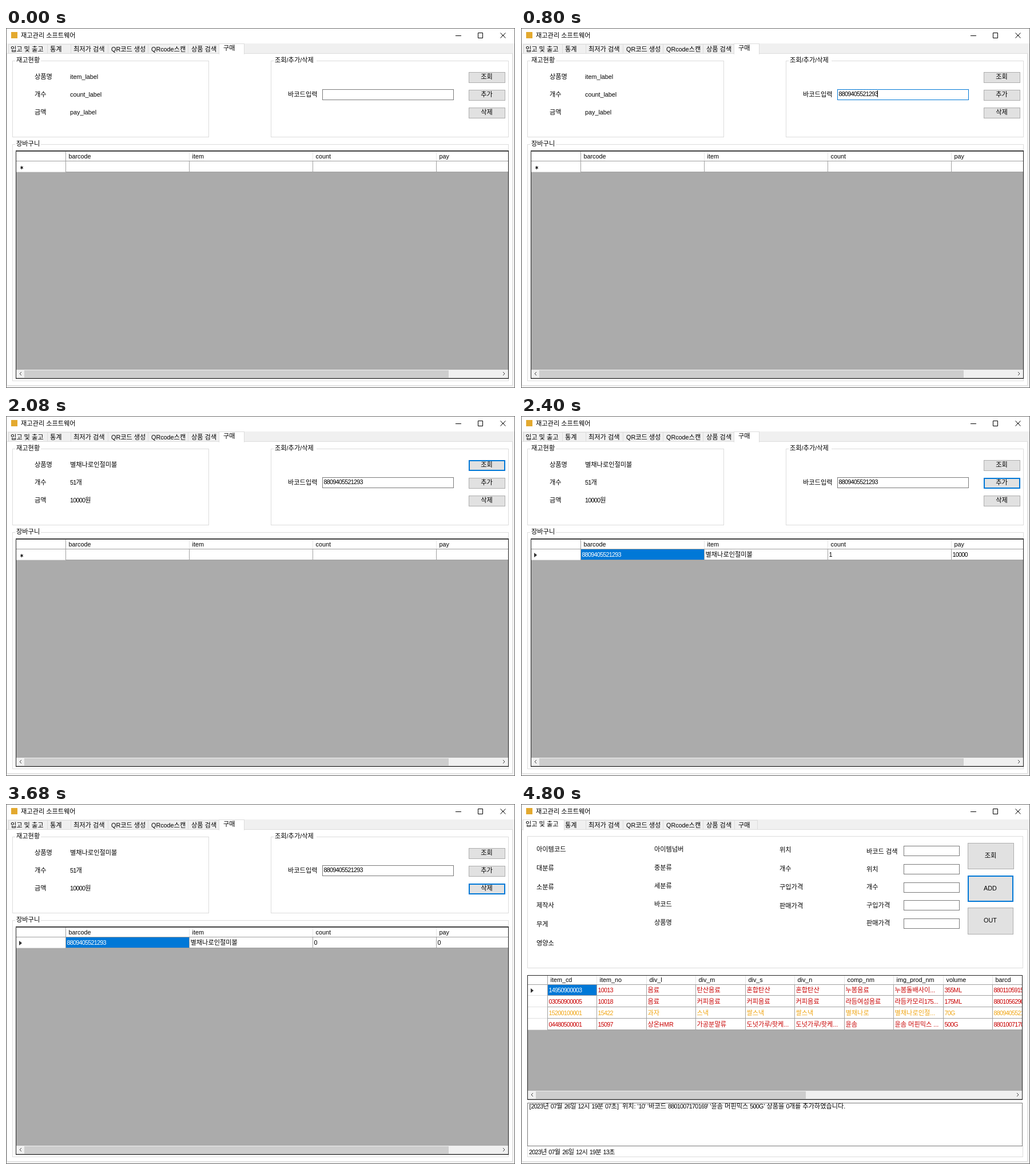
Recreate the animation shown at these times as an HTML page. Size 890 by 629 pixels, loop 5600 ms.

```html
<!DOCTYPE html>
<html lang="ko">
<head>
<meta charset="utf-8">
<style>
  html, body { margin: 0; height: 100%; overflow: hidden; }
  svg { display: block; }
  text { font: 10.8px "Liberation Sans", "Noto Sans CJK KR", sans-serif; white-space: pre; }
  .ko { font-size: 11.2px; }
  .num { letter-spacing: -.75px; }
  rect { shape-rendering: crispEdges; }
</style>
</head>
<body>
<svg id="stage" width="890" height="629" viewBox="0 0 890 629"></svg>
<script>
const STEP = 800;
const BLUE = '#0078d7', LIGHT = '#dcdcdc', LINE = '#a0a0a0', FACE = '#f0f0f0', RED = '#c80000', ORANGE = '#f0a514';
const BALL = '별채나로인절미볼', CIDER = '누봄돌배사이다355ML', COFFEE = '라듬카모리175ML';
const BALL_CODE = '8809405521293', COFFEE_CODE = '8801056290016', CIDER_CODE = '8801105915419';

const fill = (x, y, w, h, color) => `<rect x="${x}" y="${y}" width="${w}" height="${h}" fill="${color}"/>`;
const hline = (x1, x2, y, color) => fill(x1, y, x2 - x1, 1, color);
const vline = (x, y1, y2, color) => fill(x, y1, 1, y2 - y1, color);
const box = (x1, y1, x2, y2, stroke, inside = '#fff', weight = 1) =>
  `<rect x="${x1 + weight / 2}" y="${y1 + weight / 2}" width="${x2 - x1 + 1 - weight}" height="${y2 - y1 + 1 - weight}"
    fill="${inside}" stroke="${stroke}" stroke-width="${weight}"/>`;
const path = (d, color = '#000') => `<path d="${d}" fill="none" stroke="${color}"/>`;

// y is the middle of the line; Hangul and digits get their own metrics
function text(x, y, str, color = '#000', anchor = 'start') {
  const runs = str.replace(/[가-힣]+|\d+/g, run =>
    `<tspan class="${/\d/.test(run) ? 'num' : 'ko'}">${run}</tspan>`);
  return `<text x="${x}" y="${y + 4}" fill="${color}" text-anchor="${anchor}">${runs}</text>`;
}
const labels = (x, list) => list.map(([str, y]) => text(x, y, str)).join('');

function button(x1, y1, x2, y2, caption, focused) {
  return box(x1, y1, x2, y2, focused ? BLUE : '#adadad', '#e1e1e1', focused ? 2 : 1)
    + text((x1 + x2) / 2, (y1 + y2) / 2 - 1, caption, '#000', 'middle');
}

function group(x1, y1, x2, y2, title, gap) {
  return box(x1, y1, x2, y2, LIGHT) + fill(x1 + 5, y1, gap, 1, '#fff') + text(x1 + 7, y1 - 1, title);
}

function scrollbar(x1, x2, y, thumbEnd) {
  return fill(x1, y, x2 - x1, 14, FACE) + fill(x1 + 14, y + 1, thumbEnd - x1 - 14, 13, '#cdcdcd')
    + path(`M${x1 + 9} ${y + 4}l-3 3l3 3M${x2 - 9} ${y + 4}l3 3l-3 3`, '#404040');
}

// Data grid whose first cell is selected unless it holds only the blank new row
function grid(g) {
  const { x1, y1, x2, y2, cols, heads, rows, top, colors = [] } = g;
  const blank = !rows.length;
  const count = Math.max(rows.length, 1);
  const bottom = top + count * 20;
  let out = box(x1, y1, x2, y2, '#202020', '#ababab')
    + fill(x1 + 1, y1 + 1, x2 - x1 - 1, bottom - y1 - 1, '#fff')
    + hline(x1 + 1, x2, top, LINE);
  for (let r = 1; r <= count; r++)
    out += hline(x1 + 1, cols[0], top + r * 20 - 1, '#e0e0e0') + hline(cols[0], x2, top + r * 20 - 1, LINE);
  cols.forEach((x, c) => {
    out += vline(x, y1 + 1, top, c ? '#e5e5e5' : LINE) + vline(x, top, bottom, LINE) + text(x + 5.5, top - 8, heads[c]);
  });
  if (!blank) out += fill(cols[0] + 1, top + 1, cols[1] - cols[0] - 1, 18, BLUE);
  rows.forEach((row, r) => row.forEach((str, c) => {
    out += text(cols[c] + 2.5, top + 9.5 + r * 20, str, r + c ? colors[r] : '#fff');
  }));
  const my = top + 11;
  out += blank
    ? path(`M${x1 + 10.5} ${my - 2}v6M${x1 + 8} ${my - .5}l5 3m0-3l-5 3`)
    : `<path d="M${x1 + 6} ${my - 4}l5 4l-5 4z" fill="#303030"/>`;
  return `<svg width="${x2}" height="629">${out}</svg>` + vline(x2, y1, y2 + 1, '#202020')
    + scrollbar(x1 + 1, x2, y2 - 15, g.thumbEnd);
}

const TABS = ['입고 및 출고', '통계', '최저가 검색', 'QR코드 생성', 'QRcode스캔', '상품 검색', '구매'];
const TAB_EDGES = [4, 72, 113, 178, 248, 318, 373, 413];
const TAB_TEXT = [8, 77, 118, 184, 254, 324, 380];

function chrome(active) {
  const tab = i => {
    const on = i === active ? 2 : 0;
    return box(TAB_EDGES[i] - on / 2, 28 - on / 2, TAB_EDGES[i + 1] + on * 1.5, 45, LIGHT, on ? '#fff' : FACE)
      + (on && fill(TAB_EDGES[i], 44, TAB_EDGES[i + 1] - TAB_EDGES[i] + 3, 2, '#fff') || '')
      + text(TAB_TEXT[i], on ? 35 : 36.5, TABS[i]);
  };
  const rest = TABS.map((_, i) => i).filter(i => i !== active);
  return box(0, 0, 889, 628, '#6e6e6e', FACE) + fill(1, 1, 888, 26, '#fff')
    + fill(9, 7, 11, 11, '#e3a92f') + text(26, 13, '재고관리 소프트웨어')
    + path('M786 13.5h10M825.5 8.5h8v9h-8zM864.5 8.5l9 9m0-9l-9 9')
    + rest.map(tab).join('') + box(1, 44, 885, 624, LIGHT) + tab(active);
}

function cartPage({ name = 'item_label', count = 'count_label', pay = 'pay_label', code = '', focus, rows = [] }) {
  return chrome(6)
    + group(11, 57, 354, 190, '재고현황', 45)
    + labels(50, [['상품명', 85], ['개수', 116], ['금액', 147]])
    + labels(112, [[name, 85], [count, 116], [pay, 147]])
    + group(463, 57, 878, 190, '조회/추가/삭제', 75)
    + text(493, 116, '바코드입력')
    + box(553, 107, 782, 125, focus === 'input' ? BLUE : '#7a7a7a') + text(555.5, 114.5, code)
    + (focus === 'input' ? vline(623, 109, 121, '#000') : '')
    + ['조회', '추가', '삭제'].map((s, i) => button(809, 77 + i * 31, 872, 95 + i * 31, s, focus === s)).join('')
    + group(11, 203, 878, 616, '장바구니', 45)
    + grid({ x1: 17, y1: 214, x2: 878, y2: 612, cols: [104, 320, 536, 752], top: 232,
        heads: ['barcode', 'item', 'count', 'pay'], rows, thumbEnd: 774 })
    + hline(17, 878, 215, '#606060');
}

function stockPage() {
  const cols = Array.from({ length: 10 }, (_, i) => Math.floor(46.5 + i * 86.45));
  const fields = ['바코드 검색', '위치', '개수', '구입가격', '판매가격'];
  return chrome(0) + box(11, 56, 877, 286, LIGHT)
    + labels(27, ['아이템코드', '대분류', '소분류', '제작사', '무게', '영양소'].map((s, i) => [s, 79 + i * 32.8]))
    + labels(233, ['아이템넘버', '중분류', '세분류', '바코드', '상품명'].map((s, i) => [s, 79 + i * 32]))
    + labels(452, ['위치', '개수', '구입가격', '판매가격'].map((s, i) => [s, 80 + i * 32.7]))
    + fields.map((s, i) => text(604, 83 + i * 31.2, s)
        + box(669, Math.round(73 + i * 31.8), 766, Math.round(90 + i * 31.8), '#7a7a7a')).join('')
    + button(781, 68, 861, 113, '조회') + button(781, 125, 860, 170, 'ADD', true) + button(781, 181, 860, 227, 'OUT')
    + grid({ x1: 11, y1: 299, x2: 876, y2: 516, cols, top: 315, thumbEnd: 498,
        colors: [RED, RED, ORANGE, RED],
        heads: ['item_cd', 'item_no', 'div_l', 'div_m', 'div_s', 'div_n', 'comp_nm', 'img_prod_nm', 'volume', 'barcd'],
        rows: [
          ['14950900003', '10013', '음료', '탄산음료', '혼합탄산', '혼합탄산', '누봄음료', '누봄돌배사이...', '355ML', CIDER_CODE],
          ['03050900005', '10018', '음료', '커피음료', '커피음료', '커피음료', '라듬여섬음료', '라듬카모리175...', '175ML', COFFEE_CODE],
          ['15200100001', '15422', '과자', '스낵', '쌀스낵', '쌀스낵', '별채나로', '별채나로인절...', '70G', BALL_CODE],
          ['04480500001', '15097', '상온HMR', '가공분말류', '도넛가루/핫케...', '도넛가루/핫케...', '윤솜', '윤솜 머핀믹스 ...', '500G', '8801007170169']
        ] })
    + box(11, 597, 877, 616, LIGHT) + box(11, 522, 876, 597, '#7a7a7a')
    + text(14.5, 528, "[2023년 07월 26일 12시 19분 07초]  위치: '10' '바코드 8801007170169' '윤솜 머핀믹스 500G' 상품을 0개를 추가하였습니다.")
    + text(14, 608, '2023년 07월 26일 12시 19분 13초');
}

const ball = { name: BALL, count: '51개', pay: '10000원', code: BALL_CODE };
const scenes = [
  cartPage({}),
  cartPage({ code: BALL_CODE, focus: 'input' }),
  cartPage({ ...ball, focus: '조회' }),
  cartPage({ ...ball, focus: '추가', rows: [[BALL_CODE, BALL, '1', '10000']] }),
  cartPage({ ...ball, focus: '삭제', rows: [[BALL_CODE, BALL, '0', '0']] }),
  cartPage({ name: CIDER, count: '12개', pay: '1000원', code: CIDER_CODE, focus: '추가', rows: [
    [BALL_CODE, BALL, '11', '110000'],
    [COFFEE_CODE, COFFEE, '9', '6300'],
    [CIDER_CODE, CIDER, '8', '8000']
  ] }),
  stockPage()
];

const stage = document.getElementById('stage');
let shown = -1;
function draw() {
  const scene = Math.floor(performance.now() / STEP) % scenes.length;
  if (scene !== shown) stage.innerHTML = scenes[shown = scene];
  requestAnimationFrame(draw);
}
draw();
</script>
</body>
</html>
```
